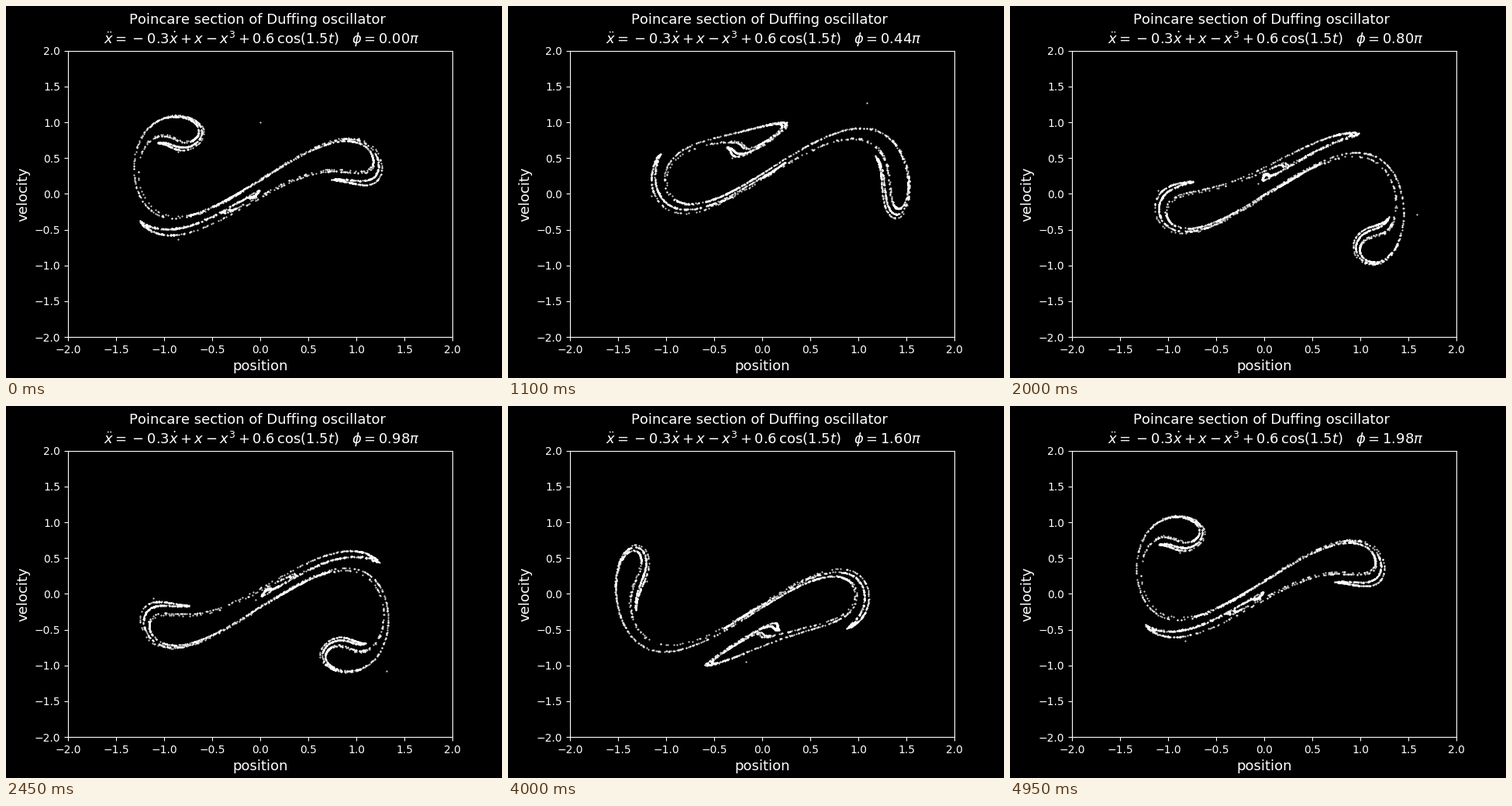
A matplotlib script that plays this animation: 640x480 px, repeating every 5000 ms.

```python
import math

import numpy as np
import matplotlib.pyplot as plt
from matplotlib.animation import FuncAnimation

DAMPING, DRIVE, OMEGA = 0.3, 0.6, 1.5
PHASES = 100      # sections per driving period, one per frame
PERIODS = 2500    # points in each section
INTERVAL = 50     # ms


def accel(x, v, force):
    return -DAMPING * v + x - x**3 + force


def integrate():
    """Runge-Kutta trajectory, sampled at every phase of every period."""
    h = 2 * math.pi / OMEGA / PHASES
    drive = [DRIVE * math.cos(math.pi * k / PHASES) for k in range(2 * PHASES + 1)]
    x, v = 0.0, 1.0
    path = []
    for _ in range(PERIODS):
        for k in range(PHASES):
            path.append((x, v))
            f0, f1, f2 = drive[2 * k:2 * k + 3]
            a1 = accel(x, v, f0)
            v2 = v + h / 2 * a1
            a2 = accel(x + h / 2 * v, v2, f1)
            v3 = v + h / 2 * a2
            a3 = accel(x + h / 2 * v2, v3, f1)
            v4 = v + h * a3
            a4 = accel(x + h * v3, v4, f2)
            x += h / 6 * (v + 2 * v2 + 2 * v3 + v4)
            v += h / 6 * (a1 + 2 * a2 + 2 * a3 + a4)
    return np.array(path).reshape(PERIODS, PHASES, 2)


def heading(k):
    return ("Poincare section of Duffing oscillator \n "
            r"$\ddot{x} = \hspace{0.2}{-}\hspace{0.2}0.3\dot{x} + x - x^3"
            r" + 0.6\,\cos(1.5t)$   "
            rf"$\phi = {2 * k / PHASES:.2f}\pi$")


path = integrate()

plt.style.use("dark_background")
plt.rcParams["font.family"] = "DejaVu Sans"
plt.rcParams["text.kerning_factor"] = 6
fig, ax = plt.subplots(figsize=(6.4, 4.8), dpi=100)
ax.set_xlim(-2, 2)
ax.set_ylim(-2, 2)
ax.set_xlabel("position", fontsize=13)
ax.set_ylabel("velocity", fontsize=13)
title = ax.set_title(heading(0), fontsize=13, x=0.499)
dots, = ax.plot([], [], ".", color="white", markersize=1)


def update(k):
    dots.set_data(path[:, k, 0], path[:, k, 1])
    title.set_text(heading(k))
    return dots, title


anim = FuncAnimation(fig, update, frames=PHASES, interval=INTERVAL,
                     repeat=True, repeat_delay=0, blit=False)
plt.show()
```
